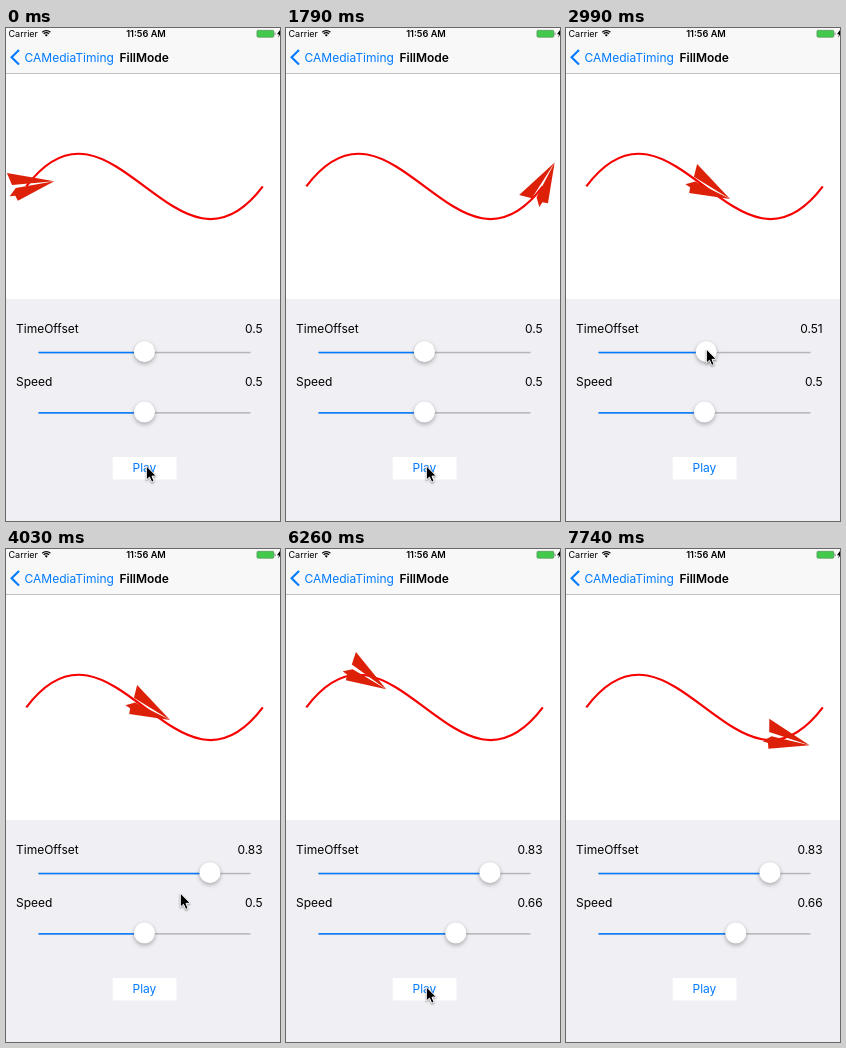
Recreate the animation shown at these times as an HTML page with a canvas. Size 274 px wide and 493 px high, loop 8.49 s.

```html
<!DOCTYPE html>
<html lang="en">
<head>
<meta charset="utf-8">
<title>FillMode</title>
<style>
html, body { margin: 0; width: 100%; height: 100%; overflow: hidden; background: #efeff4; }
canvas { display: block; width: 274px; height: 493px; }
</style>
</head>
<body>
<canvas id="stage"></canvas>
<script>
const W = 274, H = 493, LOOP = 8490, STEP = 148.85;
const BLUE = '#007aff', RED = '#f80000', PLANE = '#dd2008';
const FONT = 'Inter, Roboto, sans-serif';

const canvas = document.getElementById('stage');
const ctx = canvas.getContext('2d');
const dpr = window.devicePixelRatio || 1;
canvas.width = W * dpr;
canvas.height = H * dpr;

const mix = (a, b, f) => a + (b - a) * f;
const smooth = f => f * f * (3 - 2 * f);
const span = (k, from, to) => Math.min(1, Math.max(0, (k - from) / (to - from)));

// Flight path: a point-symmetric cubic, handles 36% of the width across
const left = 20.3, right = 256.8, midY = 158.4, swing = 113.3;
const P = [
  [left, midY],
  [mix(left, right, 0.36), midY - swing],
  [mix(left, right, 0.64), midY + swing],
  [right, midY]
];

function pathAt(u) {
  const v = 1 - u;
  const pos = i => v ** 3 * P[0][i] + 3 * v * v * u * P[1][i] + 3 * v * u * u * P[2][i] + u ** 3 * P[3][i];
  const vel = i => v * v * (P[1][i] - P[0][i]) + 2 * v * u * (P[2][i] - P[1][i]) + u * u * (P[3][i] - P[2][i]);
  return { x: pos(0), y: pos(1), angle: Math.atan2(vel(1), vel(0)) };
}

// Each run starts at its time offset, wraps, and freezes where it began
const runs = [
  { start: 795, offset: 0.5, speed: 0.5, turn: 0 },
  { start: 5657, offset: 0.834, speed: 0.66, turn: pathAt(0.5).angle }
];

function planeAt(t) {
  const run = runs.filter(r => t >= r.start).pop();
  if (!run) return { x: left, y: midY, angle: 0 };
  const done = Math.min(1, (t - run.start) * run.speed / 1000);
  const pose = pathAt((run.offset + done) % 1);
  pose.angle += run.turn;
  return pose;
}

const offsetAt = k => mix(runs[0].offset, runs[1].offset, span(k, 19, 25) ** 2);
const speedAt = k => mix(runs[0].speed, runs[1].speed, smooth(span(k, 29, 33)));
const thumbX = v => 138.5 + 196 * (v - 0.5);

// The pointer glides from stop to stop and follows the thumbs it drags
function cursorAt(k) {
  const home = [140.3, 437.8];
  let p = home;
  const glide = (to, from, until) => {
    const f = smooth(span(k, from, until));
    p = p.map((v, i) => mix(v, to[i], f));
  };
  glide([thumbX(offsetAt(k)), 321], 16, 19);
  glide([174.3, 344], 26, 27);
  glide([thumbX(speedAt(k)), 383], 28, 29);
  glide(home, 34, 37);
  glide([149, 452], 50, 51);
  return p;
}

function text(str, x, y, color = '#000', align = 'left', size = 12, weight = 400) {
  ctx.font = `${weight} ${size}px ${FONT}`;
  ctx.fillStyle = color;
  ctx.textAlign = align;
  ctx.fillText(str, x, y);
}

function rect(x, y, w, h, color) {
  ctx.fillStyle = color;
  ctx.fillRect(x, y, w, h);
}

function poly(points, color) {
  ctx.beginPath();
  points.forEach(([x, y]) => ctx.lineTo(x, y));
  ctx.closePath();
  ctx.fillStyle = color;
  ctx.fill();
}

function stroke(color, width) {
  ctx.strokeStyle = color;
  ctx.lineWidth = width;
  ctx.stroke();
}

function shadow(alpha, blur, dy) {
  ctx.shadowColor = `rgba(0,0,0,${alpha})`;
  ctx.shadowBlur = blur * dpr;
  ctx.shadowOffsetY = dy * dpr;
}

function wifi() {
  const x = 40.3, y = 8.6, a = -Math.PI / 2;
  for (const r of [6, 3.9, 1.2]) {
    ctx.beginPath();
    ctx.arc(x, y, r, a - 0.75, a + 0.75);
    stroke('#000', r < 2 ? 2 : 1.2);
  }
}

function battery() {
  ctx.beginPath();
  ctx.roundRect(250.9, 2.3, 17, 7, 1.4);
  ctx.fillStyle = '#42c94c';
  ctx.fill();
  stroke('#4f8a54', 0.6);
  rect(268.6, 4.6, 0.9, 2.4, '#777');
  poly([[274, 2], [271, 6.2], [273, 6.2], [272.2, 9.5], [275, 5.2]], '#000');
}

function header() {
  rect(0, 0, W, 45, '#f8f8f8');
  rect(0, 45, W, 1, '#c2c2c4');
  text('Carrier', 2.5, 9, '#000', 'left', 9);
  wifi();
  text('11:56 AM', 140, 9, '#000', 'center', 9.2, 600);
  battery();
  ctx.beginPath();
  ctx.moveTo(13, 22);
  ctx.lineTo(5.6, 29.3);
  ctx.lineTo(13, 36.6);
  stroke(BLUE, 2.1);
  text('CAMediaTiming', 18.5, 34, BLUE);
  text('FillMode', 113.5, 34, '#000', 'left', 12, 600);
}

function slider(label, value, textY, y) {
  const x = thumbX(value);
  text(label, 10, textY);
  text(String(Math.round(value * 100) / 100), 256.7, textY, '#000', 'right');
  rect(32.5, y, 212, 1.5, '#b6b6b8');
  rect(32.5, y, x - 32.5, 1.5, BLUE);
  ctx.save();
  shadow(0.28, 4, 2);
  ctx.beginPath();
  ctx.arc(x, y - 0.2, 10.6, 0, Math.PI * 2);
  ctx.fillStyle = '#fff';
  ctx.fill();
  ctx.restore();
  stroke('rgba(0,0,0,.1)', 0.4);
}

function curve() {
  ctx.beginPath();
  ctx.moveTo(...P[0]);
  ctx.bezierCurveTo(...P[1], ...P[2], ...P[3]);
  stroke(RED, 2.2);
}

function plane({ x, y, angle }) {
  const tip = [28, -5.2];
  ctx.save();
  ctx.translate(x, y);
  ctx.rotate(angle);
  poly([[-19.4, -13.5], tip, [-14.3, -1.4]], PLANE);
  poly([tip, [-10.5, 1.6], [-16.6, 9.8], [-11, 9.4], [-8.4, 14.4]], PLANE);
  ctx.restore();
}

function cursor([x, y]) {
  ctx.save();
  ctx.translate(x, y);
  shadow(0.3, 2, 1);
  poly([[0, 0], [0, 14.2], [3.2, 11.3], [5.4, 16.4], [7.8, 15.4], [5.7, 10.4], [10, 10.2]], '#000');
  stroke('#fff', 1);
  ctx.restore();
}

function button(t) {
  const pressed = runs.some(r => t > r.start && t - r.start < STEP);
  rect(106.7, 429, 63.8, 22.5, '#fff');
  ctx.globalAlpha = pressed ? 0.5 : 1;
  text('Play', 138.4, 444.1, BLUE, 'center');
  ctx.globalAlpha = 1;
}

function draw(now) {
  // The screen refreshes in even steps
  const k = Math.floor((now % LOOP) / STEP + 0.05);
  const t = k * STEP;
  ctx.setTransform(dpr, 0, 0, dpr, 0, 0);
  rect(0, 0, W, H, '#efeff4');
  rect(0, 45, W, 226, '#fff');
  header();
  slider('TimeOffset', offsetAt(k), 305, 323.8);
  slider('Speed', speedAt(k), 358, 384.1);
  button(t);
  curve();
  plane(planeAt(t));
  if (k < 52) cursor(cursorAt(k));
  requestAnimationFrame(draw);
}
requestAnimationFrame(draw);
</script>
</body>
</html>
```
